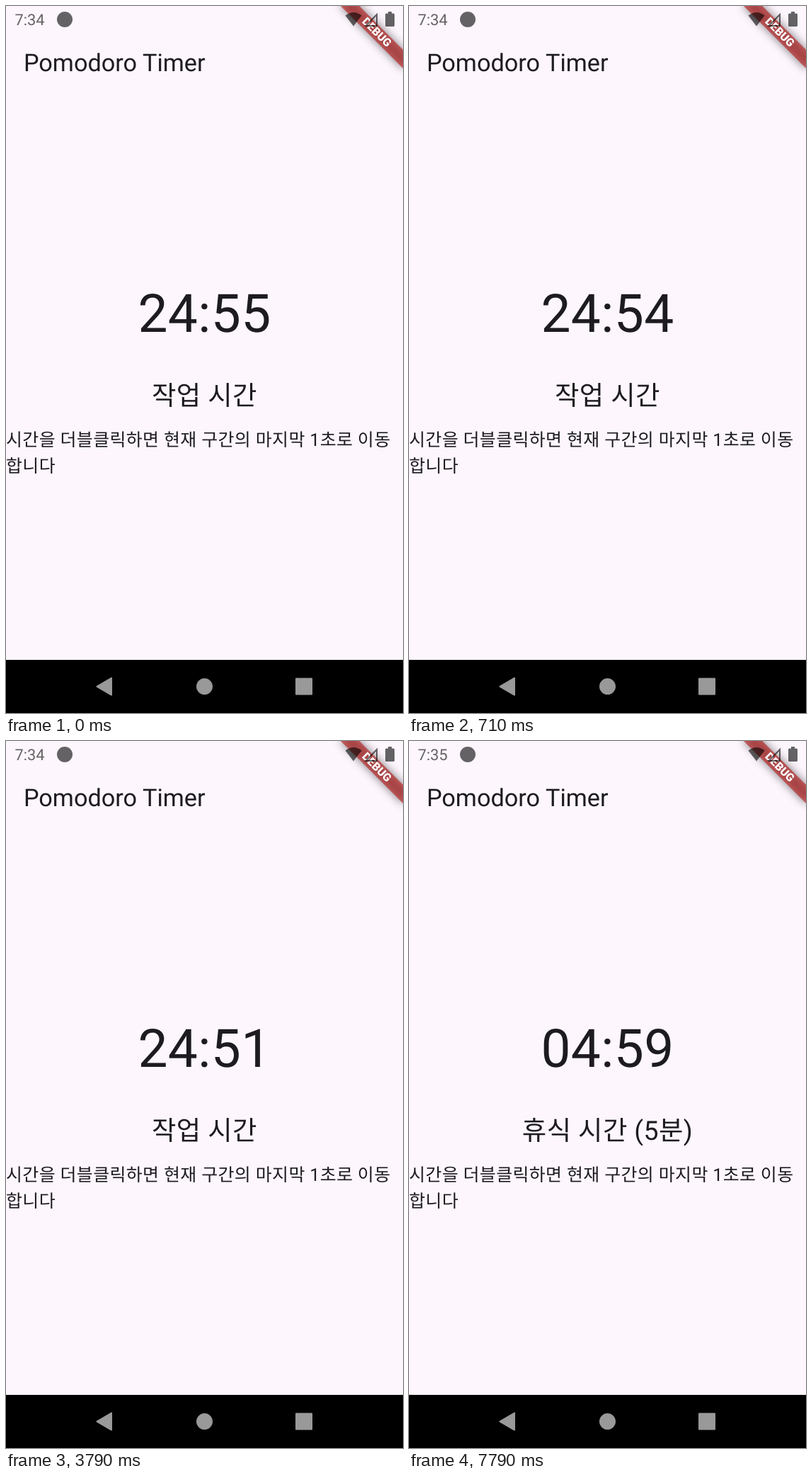
Recreate the animation shown at these times as an HTML page. Size 561 by 998 pixels, loop 8 s.

```html
<!DOCTYPE html>
<html lang="ko">
<head>
<meta charset="utf-8">
<title>Pomodoro Timer</title>
<style>
  html, body { margin: 0; width: 100%; height: 100%; overflow: hidden; background: #fdf6fd; }
  svg { display: block; width: 561px; height: 998px; }
  text {
    font-family: Roboto, "Noto Sans CJK KR", "Noto Sans CJK", sans-serif;
    fill: #1d1b20;
    text-rendering: geometricPrecision;
  }
  .body { letter-spacing: .39px; }
  .mid { text-anchor: middle; }
  #timer { font-size: 74.8px; }
  #phase { font-size: 37.4px; }
  .hint { font-size: 24.93px; }
  .title { font-size: 34.28px; }
  #clock { font-size: 21.8px; fill: #000; }
  .ribbon { font-size: 15.9px; font-weight: 900; fill: #fff; }
</style>
</head>
<body>
<svg viewBox="0 0 561 998">
  <defs>
    <filter id="soft" x="-30%" y="-150%" width="160%" height="400%">
      <feGaussianBlur stdDeviation="6.2"/>
    </filter>
  </defs>
  <rect width="561" height="998" fill="#fdf6fd"/>

  <text class="title" x="24.9" y="92">Pomodoro Timer</text>
  <text id="timer" class="body mid" x="280.5" y="460.2">24:55</text>
  <text id="phase" class="body mid" x="280.5" y="563">작업 시간</text>
  <text class="body hint" x="0" y="620.6">시간을 더블클릭하면 현재 구간의 마지막 1초로 이동</text>
  <text class="body hint" x="0" y="658">합니다</text>

  <!-- corner ribbon -->
  <g transform="translate(561 0) rotate(45)">
    <rect x="-62.3" y="43.6" width="124.6" height="18.7" fill="#000" fill-opacity=".5" filter="url(#soft)"/>
    <rect x="-62.3" y="43.6" width="124.6" height="18.7" fill="#b71c1c" fill-opacity=".627"/>
    <text class="ribbon mid" x="0" y="57.7">DEBUG</text>
  </g>

  <!-- status bar -->
  <g opacity=".6">
    <text id="clock" x="12.5" y="27">7:34</text>
    <circle cx="83" cy="19" r="11"/>
    <path d="M479.5 13.5Q491 4.5 502.5 13.5L491 28.5Z"/>
    <path d="M508.5 28H524V12Z" fill="none" stroke="#000" stroke-width="2"/>
    <path d="M540 8h5v2.5h2.5q1.5 0 1.5 1.5v15.5q0 1.5-1.5 1.5h-10q-1.5 0-1.5-1.5V12q0-1.5 1.5-1.5h2.5z"/>
  </g>

  <!-- navigation bar -->
  <rect y="923" width="561" height="75"/>
  <g fill="#999" stroke="#999" stroke-width="2" stroke-linejoin="round">
    <path d="M128.5 960.6L149 948.6V972.6Z"/>
    <circle cx="280.5" cy="960.6" r="10.5"/>
    <rect x="410" y="949.6" width="22" height="22"/>
  </g>
</svg>
<script>
  const LOOP = 8000, WORK = '작업 시간', REST = '휴식 시간 (5분)';
  const ticks = [
    [0, '24:55'], [420, '24:54'], [1460, '24:53'], [2420, '24:52'],
    [3460, '24:51'], [4420, '24:50'], [5040, '00:01'], [5460, '00:00'],
    [6420, '05:00'], [7460, '04:59']
  ];
  const phases = [[0, WORK], [6420, REST]];
  const clocks = [[0, '7:34'], [7420, '7:35']];

  const at = (steps, t) => steps.filter(([time]) => time <= t).pop()[1];

  function show(id, value) {
    const el = document.getElementById(id);
    if (el.textContent !== value) el.textContent = value;
  }

  const start = performance.now();
  function draw() {
    const t = (performance.now() - start) % LOOP;
    show('timer', at(ticks, t));
    show('phase', at(phases, t));
    show('clock', at(clocks, t));
    requestAnimationFrame(draw);
  }
  draw();
</script>
</body>
</html>
```
